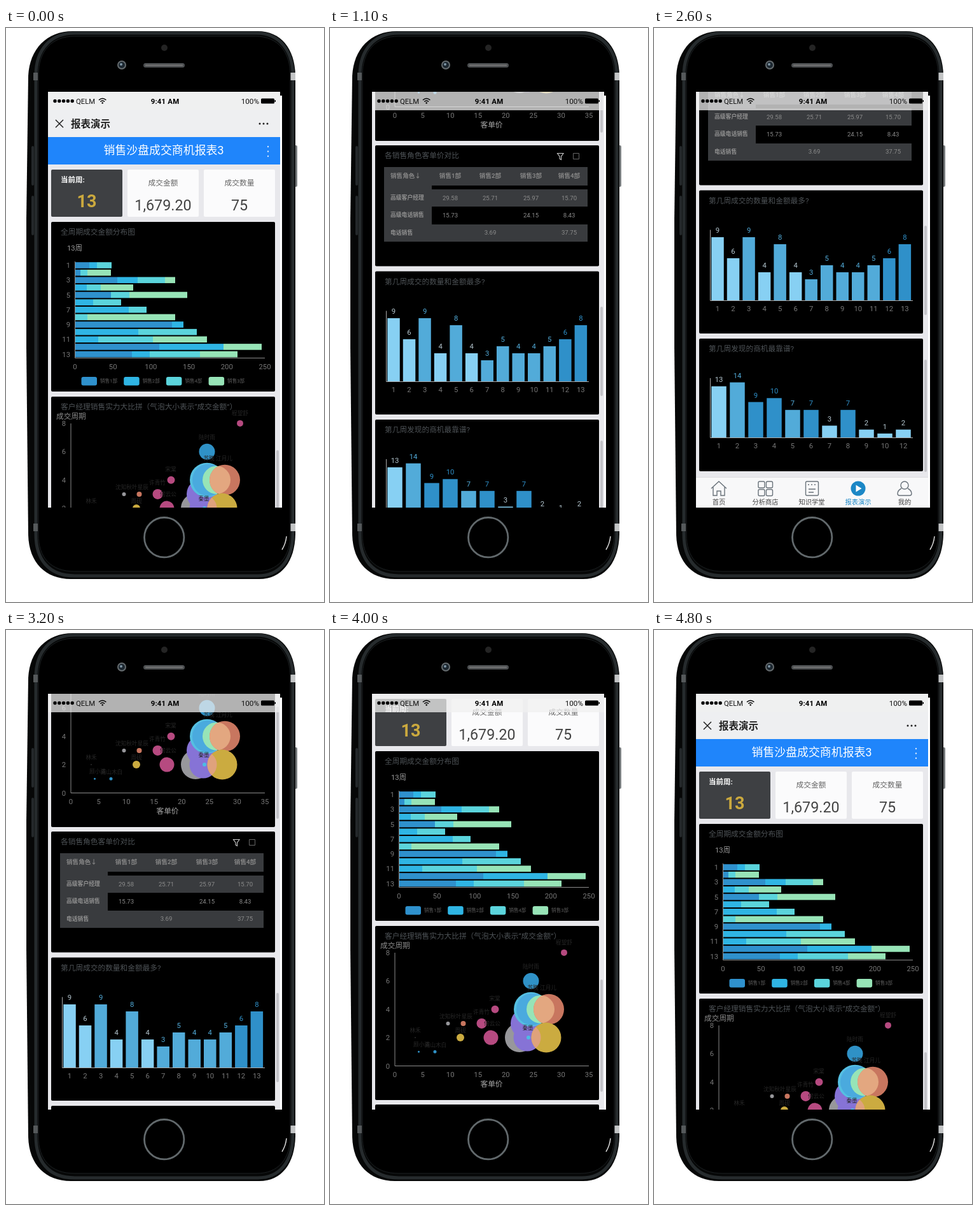
An HTML page for the animation above (5000 ms loop, 500 by 900 pixels).

```html
<!DOCTYPE html>
<html lang="zh-CN">
<head>
<meta charset="utf-8">
<style>
html, body { margin: 0; width: 100%; height: 100%; overflow: hidden; background: #fff; }
svg { display: block; }
text { font-family: Roboto, "Noto Sans CJK SC", "Noto Sans CJK", sans-serif; }
</style>
</head>
<body>
<svg id="stage" width="500" height="900" viewBox="0 0 500 900"></svg>
<script>
const rect = (x, y, w, h, fill, more = '') =>
  `<rect x="${x}" y="${y}" width="${w}" height="${h}" fill="${fill}" ${more}/>`;
const dot = (x, y, r, fill, more = '') =>
  `<circle cx="${x}" cy="${y}" r="${r}" fill="${fill}" ${more}/>`;
const path = (d, stroke, width = 1, fill = 'none') =>
  `<path d="${d}" stroke="${stroke}" stroke-width="${width}" fill="${fill}"/>`;
// y is the vertical centre of the glyphs
const text = (s, x, y, size, fill, anchor = 'start', weight = 400) =>
  `<text x="${x}" y="${y + size * .37}" font-size="${size}" fill="${fill}" text-anchor="${anchor}" font-weight="${weight}">${s}</text>`;
const mid = (s, x, y, size, fill, weight) => text(s, x, y, size, fill, 'middle', weight);
const card = (y, h, title) => rect(71, y, 352, h, '#000', 'rx="2"') + text(title, 86, y + 16, 11.7, '#4d5256');
const AXIS = '#8c8c8c', LABEL = '#777';

function header() {
  let s = rect(66, 100, 365, 71, '#eeeff1') + path('M78 144l12 12m0-12l-12 12', '#222', 1.5) +
    text('报表演示', 102, 150, 15.5, '#222', 'start', 700);
  for (const x of [399, 405, 411]) s += dot(x, 150, 1.5, '#222');
  s += rect(66, 171, 365, 43, '#1f85fb') + mid('销售沙盘成交商机报表3', 248, 191.5, 17.9, '#fff');
  for (const y of [186, 193.5, 201]) s += dot(412, y, 1.2, '#d5e8ff');
  s += rect(71, 222, 112, 74, '#3e4043', 'rx="2"') + rect(191, 222, 112, 74, '#fbfbfc', 'rx="2"') +
    rect(311, 222, 112, 74, '#fbfbfc', 'rx="2"');
  return s + text('当前周:', 86, 238, 11.5, '#fff', 'start', 700) + mid('13', 127, 271, 27, '#cba93e', 700) +
    mid('成交金额', 247, 243, 11.7, '#666') + mid('1,679.20', 247, 277, 23.3, '#444') +
    mid('成交数量', 367, 243, 11.7, '#666') + mid('75', 367, 277, 23.3, '#444');
}

function weekly() {
  const colors = ['#2f91cd', '#2fb5e4', '#5bd4dc', '#97e4b7'];
  // right edge of each stacked part; 0 means the part is absent
  const ends = [
    [131, 143, 166, 0], [117, 0, 128, 165], [175, 207, 250, 266], [0, 127, 149, 200], [165, 0, 194, 285],
    [0, 137, 181, 0], [0, 193, 221, 0], [0, 0, 128, 266], [261, 279, 0, 0], [0, 208, 300, 0],
    [0, 145, 231, 316], [241, 342, 0, 402], [198, 226, 305, 364]];
  let s = card(304, 266, '全周期成交金额分布图') + text('13周', 96, 345, 11.3, '#999');
  ends.forEach((row, i) => {
    const y = 372 + i * 11.63;
    let x = 109;
    row.forEach((end, k) => {
      if (end) { s += rect(x, y - 4.8, end - x, 9.6, colors[k]); x = end; }
    });
    if (i % 2 == 0) s += text(i + 1, 101, y, 11.3, LABEL, 'end');
  });
  s += path('M108.5 366V517.5H407', AXIS);
  for (let i = 0; i < 6; i++) s += mid(i * 50, 108.5 + i * 59.7, 531, 11.3, LABEL);
  [1, 2, 4, 3].forEach((n, i) => {
    const x = 118.5 + i * 66.7;
    s += rect(x, 547, 24.5, 13.5, colors[i], 'rx="3"') + text(`销售${n}部`, x + 29.5, 553.5, 7.6, '#5c5c5c');
  });
  return s;
}

function bubbles() {
  const pink = '#b64a80', blue = '#2f91c6', gold = '#cbab40', grey = '#97979b', rust = '#c8765f';
  const put = (x, v, r, c, more) => dot(x, 797.5 - v * 22.2, r, c, more);
  let s = card(578, 273, '客户经理销售实力大比拼（气泡大小表示“成交金额”）') +
    text('成交周期', 79, 609, 11.7, '#8a8a8a') + path('M102 620V797.5H407', AXIS);
  for (let v = 0; v < 10; v += 2) s += text(v, 94, 797.5 - v * 22.2, 11.3, LABEL, 'end');
  for (let i = 0; i < 8; i++) s += mid(i * 5, 102 + i * 43.57, 811, 11.3, LABEL);
  s += mid('客单价', 254, 826, 11.7, '#aaa');
  const list = [
    [368, 8, 5, pink], [316, 6, 12.5, blue], [259.5, 4, 6, pink], [185.5, 3, 3, grey], [209.5, 3, 4, rust],
    [238.5, 3, 8, pink], [205, 2, 6, gold], [253, 2, 11.5, pink], [139.5, 1, 1.5, blue], [165, 1, 2.5, blue],
    [134, 2, .8, '#444'], [298, 2, 23, grey], [308, 3, 24, '#8673d6'], [310, 2, 21.5, '#8673d6'],
    [316, 4, 27, '#55bfe2'], [318, 4, 25, '#4aaade'], [331, 4, 22, '#97e4b7'],
    [344, 4, 24, rust], [340, 2, 23.5, gold], [312, 2, 3, '#4cbce4']];
  for (const b of list) s += put(...b);
  // lighter overlaps
  s += `<clipPath id="a"><circle cx="344" cy="708.7" r="24"/></clipPath>
    <clipPath id="b"><circle cx="340" cy="753.1" r="23.5"/></clipPath>` +
    put(331, 4, 22, '#e3a780', 'clip-path="url(#a)"') + put(310, 2, 21.5, '#dfa27c', 'clip-path="url(#b)"');
  const names = [
    ['林禾', 134, 742], ['顾小满', 144, 764], ['南山木白', 166, 765], ['沈知秋', 185, 720], ['叶星辰', 211, 720],
    ['许青竹', 238, 713], ['宋棠', 259, 692], ['周砚', 205, 742], ['何云公', 255, 731], ['陆时雨', 316, 642],
    ['程望舒', 368, 604], ['苏晚', 319, 675], ['江月儿', 343, 675], ['秦墨', 311, 738]];
  for (const [n, x, y] of names) s += mid(n, x, y, 8.6, '#262626');
  return s;
}

function table() {
  const fill = '#393b3e', cols = [189, 252, 316, 376];
  let s = card(858, 189.5, '各销售角色客单价对比') +
    path('M357.5 870.5h9.5l-3.5 5v5l-2.5-1.5v-3.5z', '#ccc', 1.1) + path('M382.5 870.5h9v9h-9z', '#666') +
    rect(85, 892, 320, 29, fill) + rect(85, 892, 75, 117, fill) + rect(85, 927, 320, 27, fill) + rect(85, 982, 320, 27, fill) +
    text('销售角色↓', 95, 905, 9.6, '#858585', 'start', 700);
  cols.forEach((x, i) => s += mid(`销售${i + 1}部`, x, 905, 9.6, '#858585', 700));
  const rows = [['高级客户经理', '29.58', '25.71', '25.97', '15.70'], ['高级电话销售', '15.73', '', '24.15', '8.43'],
    ['电话销售', '', '3.69', '', '37.75']];
  rows.forEach(([name, ...vals], i) => {
    const y = 940 + i * 27.2;
    s += text(name, 95, y, 8.8, '#909090', 'start', 700);
    vals.forEach((v, k) => s += mid(v, cols[k], y, 9.6, '#8c8c8c'));
  });
  return s;
}

const SHADES = ['#87d0f3', '#52abd9', '#2f90c9'];
// bars: [week, value, shade]
function columns(top, h, title, bars, x0, step, w, unit, base) {
  let s = card(top, h, title);
  bars.forEach(([week, v, tone], i) => {
    const x = x0 + i * step, y = base - v * unit;
    s += rect(x - w / 2, y, w, v * unit, SHADES[tone]) +
      mid(v, x, y - 11, 11.3, tone ? SHADES[tone] : '#b4c6cf') + mid(week, x, base + 13, 11.3, LABEL);
  });
  return s + path(`M88.5 ${top + 62}V${base + .5}H407`, '#aaa');
}
const weeks = (values, tones) => values.map((v, i) => [i + 1, v, +tones[i]]);

function tabs() {
  const c = '#69727a';
  let s = rect(66, 1505, 365, 48, '#f8f8f9') + path('M66 1505.5H431', '#dcdde0') +
    path('M90 1523l12-11 12 11M93 1521v13h6v-7h6v7h6v-13', c, 1.4);
  for (const x of [164, 176.5]) for (const y of [1512, 1524.5])
    s += rect(x, y, 10, 10, 'none', `rx="2" stroke="${c}" stroke-width="1.4"`);
  s += rect(238.5, 1512, 20, 22, 'none', `rx="2" stroke="${c}" stroke-width="1.4"`) +
    path('M242 1517h2m3 0h2m3 0h2M243 1524h11M243 1529h8', c, 1.4) +
    dot(321, 1523, 11.5, '#1b87c6') + path('M317.5 1517.5v11l9-5.5z', 'none', 0, '#fff') +
    dot(394, 1518, 6, 'none', `stroke="${c}" stroke-width="1.4"`) +
    path('M389 1523c-4 2-6 5-6 8q0 3 3 3h16q3 0 3-3c0-3-2-6-6-8', c, 1.4);
  ['首页', '分析商店', '知识学堂', '报表演示', '我的'].forEach((n, i) =>
    s += mid(n, 102 + i * 73, 1544.5, 10.3, i == 3 ? '#1b87c6' : '#444'));
  return s;
}

function statusBar() {
  let s = rect(66, 100, 365, 29, '#f0f0f1', 'opacity=".74"');
  for (let i = 0; i < 5; i++) s += dot(77 + i * 6.8, 114.5, 2.7, '#000');
  return s + text('QELM', 110, 114.5, 11.3, '#111') +
    path('M146 113q5.7-5 11.4 0M148.3 115.5q3.4-3 6.8 0', '#000', 1.6) + dot(151.7, 117.5, 1.3, '#000') +
    `<g style="letter-spacing:.2px">${mid('9:41 AM', 250, 114.5, 11.4, '#000', 700)}</g>` +
    text('100%', 398, 114.5, 11.7, '#111', 'end') + rect(401, 110.5, 21, 8, '#000', 'rx="1.5"') + rect(422.5, 113, 1.5, 3, '#000');
}

function phone() {
  const body = 'M105 5H396C432 5 454 32 455 74V794C454 836 434 864 398 864H102C62 864 36 838 35 795L32 500V300L35 75C37 33 64 5 105 5Z';
  let s = rect(453, 184, 5, 65, '#777b7d', 'rx="2"') + path(body, 'none', 0, '#060707') +
    path('M108 8H394C430 8 451 36 451 74V792C451 834 430 859 396 859H108C66 859 47 832 47 794V74C47 34 70 8 108 8Z', '#262b2d', 5) +
    path('M108 13H392C428 13 447 38 447 74V792C447 830 428 852 394 852H108C70 852 51 830 51 794V74C51 36 72 13 108 13Z', '#1c2022', 1, '#000');
  for (const y of [70, 777]) s += rect(43, y, 7, 12, '#55595b') + rect(447.5, y, 7.5, 12, '#c3c5c6');
  for (const y of [185, 263]) s += rect(40, y, 4, 62, '#24282a', 'rx="2"');
  s += dot(249, 31, 5, '#242424') + dot(182, 58, 7, '#666c6f') + dot(182, 58, 5, '#1c2730') + dot(181, 57, 2, '#7d93a2') +
    rect(216, 55, 65, 7, '#4c4f51', 'rx="3.5"') + path('M219 58.5H278', '#777', 2);
  return s + dot(248.7, 798.7, 31.2, '#000', 'stroke="#62696c" stroke-width="2.8"') +
    path('M434 818Q440 808 441 797', '#ddd', 1.5);
}

const amounts = weeks([9, 6, 9, 4, 8, 4, 3, 5, 4, 4, 5, 6, 8], '0010101111122');
const leads = weeks([13, 14, 9, 10, 7, 7, 3, 7, 2, 1, 2], '01221202000');
leads[10][0] = 12; // week 11 had no leads

document.getElementById('stage').innerHTML = phone() + rect(66, 106, 368, 646, '#fff') +
  `<clipPath id="screen">${rect(66, 100, 365, 652, '#000')}</clipPath><g clip-path="url(#screen)">` +
  rect(66, 100, 365, 652, '#e8e8ec') + '<g id="page">' + header() + weekly() + bubbles() + table() +
  columns(1055.5, 224.5, '第几周成交的数量和金额最多?', amounts, 100, 24.53, 19.5, 11, 1228) +
  columns(1288, 208, '第几周发现的商机最靠谱?', leads, 102, 29, 23.5, 6.17, 1443) +
  tabs() + [[662, 176], [1111, 140], [1321, 176]].map(([y, h]) => rect(425, y, 4, h, '#c3c3c8', 'rx="2"')).join('') +
  '</g>' + statusBar() + '</g>';

// Scroll offsets over time, joined by monotone cubic curves
const keys = [[200, 0], [700, 497], [1100, 674], [1800, 793], [2300, 801], [2600, 801], [2900, 742],
  [3200, 542], [3600, 275], [4000, 114], [4400, 32], [4800, 0]];
const slope = i => (keys[i + 1][1] - keys[i][1]) / (keys[i + 1][0] - keys[i][0]);
const tangent = i => {
  if (i == 0) return slope(0) * 1.25;
  if (i == keys.length - 1) return 0;
  const a = slope(i - 1), b = slope(i);
  return a * b > 0 ? 2 * a * b / (a + b) : 0;
};
function scrollAt(t) {
  if (t <= 200 || t >= 4800) return 0;
  const i = keys.findIndex(k => k[0] > t) - 1;
  const [t0, a] = keys[i], [t1, b] = keys[i + 1], h = t1 - t0, u = (t - t0) / h, v = 1 - u;
  return a * v * v * (1 + 2 * u) + b * u * u * (3 - 2 * u) + h * u * v * (tangent(i) * v - tangent(i + 1) * u);
}

const page = document.getElementById('page');
function draw() {
  const t = Math.floor(performance.now() % 5000 / 100) * 100;
  page.setAttribute('transform', `translate(0 ${-Math.round(scrollAt(t))})`);
  requestAnimationFrame(draw);
}
draw();
</script>
</body>
</html>
```
